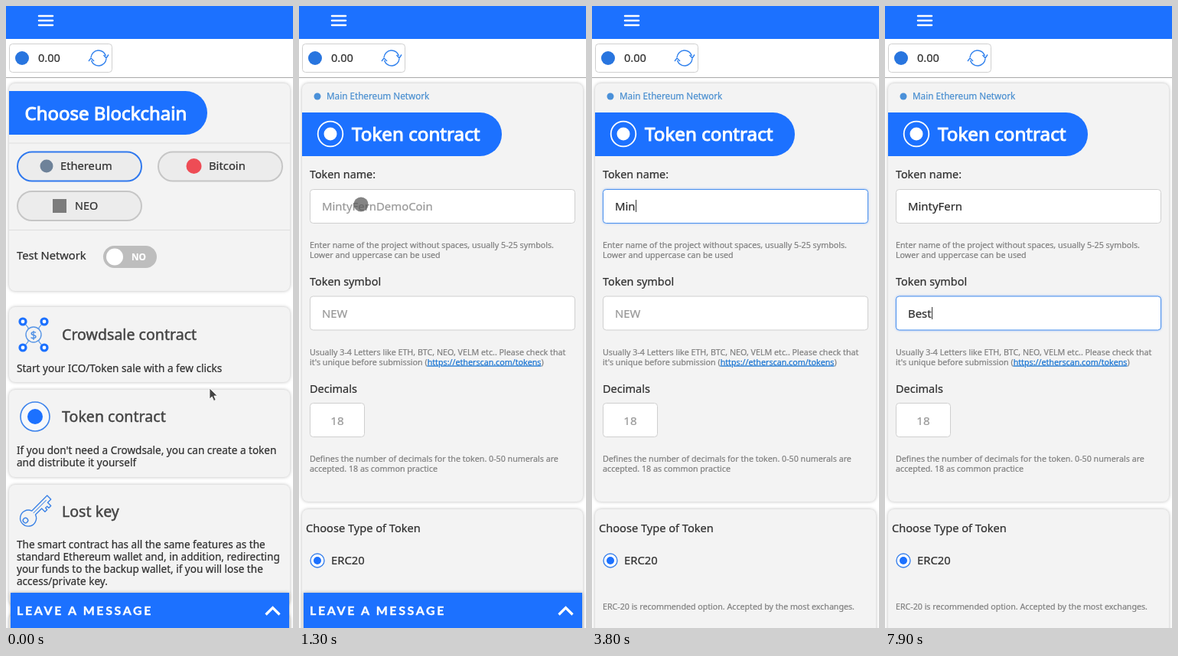
An HTML page that plays this animation: 375x812 px, repeating every 8 s.

```html
<!DOCTYPE html>
<html lang="en">
<head>
<meta charset="utf-8">
<title>Token form</title>
<style>
  html, body { margin: 0; width: 100%; height: 100%; overflow: hidden; background: #fff; }
  svg { display: block; width: 100vw; height: 100vh; }
  text { font-family: "Noto Sans", "Open Sans", sans-serif; white-space: pre; }
  .card { fill: #f3f3f3; filter: drop-shadow(0 0 2px rgba(0, 0, 0, .28)); }
  .focus { filter: drop-shadow(0 0 1.5px rgba(40, 120, 255, .45)); }
  .cta { font-family: Lato, sans-serif; font-weight: 700; letter-spacing: 2.6px; }
</style>
</head>
<body>
<svg id="stage" viewBox="0 0 375 812" xmlns="http://www.w3.org/2000/svg"></svg>
<script>
const LOOP = 8000;
const BLUE = '#1c71ff';
const INK = '#303030';
const GREY = '#808080';
const HINT = '#999';
const LINE = '#cfcfcf';
const FOCUS = '#4a90ec';
const NAME = 'MintyFern';
const SYMBOL = 'Best';

const text = (x, y, size, str, fill = INK, extra = '', weight = .22) =>
  `<text x="${x}" y="${y}" font-size="${size}" fill="${fill}" stroke="${fill}" stroke-width="${weight}" ${extra}>${str}</text>`;
const lines = (x, y, step, size, rows, fill) =>
  rows.map((row, i) => text(x, y + i * step, size, row, fill)).join('');
const heading = (x, y, str) => text(x, y, 19.6, str, '#444', '', .45);
const title = (x, y, size, str) => text(x, y, size, str, '#fff', '', 1);
const box = (x, y, w, h, r, attrs) =>
  `<rect x="${x}" y="${y}" width="${w}" height="${h}" rx="${r}" ${attrs}/>`;
const dot = (x, y, r, attrs) => `<circle cx="${x}" cy="${y}" r="${r}" ${attrs}/>`;
const path = (d, stroke, width, extra = '') =>
  `<path d="${d}" fill="none" stroke="${stroke}" stroke-width="${width}" ${extra}/>`;
const card = (y, h) => box(4, y, 367, h, 8, 'class="card"');
const ribbon = (y, right) =>
  `<path d="M4 ${y}H${right - 28.5}a28.5 28.5 0 0 1 0 57H4z" fill="${BLUE}"/>`;
const option = (x, y, color) =>
  box(x, y, 162, 38, 19, `fill="#ececec" stroke="${color}" stroke-width="2"`);
const field = (id, y, w = 346) =>
  box(14.5, y, w, 44, 4, `id="${id}" fill="#fff" stroke="${LINE}"`);

const header =
  box(0, 0, 375, 43, 0, `fill="${BLUE}"`) +
  path('M43 13H61M43 19H61M43 25H61', '#fff', 2.5, 'stroke-linecap="round"') +
  path('M0 93.5H375', '#a9a9a9', 1.2) +
  box(4.5, 49.5, 134, 37, 4, `fill="#fff" stroke="${LINE}"`) +
  dot(21, 68, 9, 'fill="#2875df"') +
  text(42, 73, 14.6, '0.00') +
  path('M111 67A10 10 0 0 1 130.5 65M131 69A10 10 0 0 1 111.5 71M127.5 64l3.5 4 3-4.5M108 72l3-4 4 4', '#2f80ed', 1.4);

const saleIcon =
  path('M25 415l4 5V424M47 415l-4 5V424M25 443l4-5V435M47 443l-4-5V435', '#5795e6', 1.2) +
  dot(36, 429, 10, 'fill="#f3f3f3" stroke="#5795e6" stroke-width="1.4"') +
  text(36, 434.5, 15, '$', '#4289e4', 'text-anchor="middle"') +
  [[22, 412], [50, 412], [22, 446], [50, 446]].map(([x, y]) =>
    dot(x, y, 4, `fill="#fff" stroke="${BLUE}" stroke-width="3.2"`)).join('');

const keyIcon = `<g transform="translate(29 668) rotate(-45)">` +
  path('M9.5 -3A10.5 10.5 0 1 0 9.5 4H21V10H25V7H28V10H32V4H38V-3Z', '#3c83e6', 1.4, 'stroke-linejoin="round"') +
  dot(-5, 0, 3.2, 'fill="none" stroke="#3c83e6" stroke-width="1.4"') +
  path('M9 .5H33', '#3c83e6', 1) + '</g>';

const menuPage =
  card(101, 271) + ribbon(111, 263) +
  title(24.5, 149, 24, 'Choose Blockchain') +
  path('M4 179H371M4 292.5H371', '#dedede', 1) +
  option(15, 190.5, '#3079ee') + option(199, 190.5, '#c6c6c6') + option(15, 242, '#c6c6c6') +
  dot(53, 209, 8.5, 'fill="#6e8299"') + text(71, 214, 14.7, 'Ethereum') +
  dot(245.5, 209, 10, 'fill="#ee4c55"') + text(265, 214, 14.8, 'Bitcoin') +
  box(61, 252, 18, 18, 0, 'fill="#7c7c7c"') + text(90, 266, 14.4, 'NEO') +
  text(14, 331, 14.7, 'Test Network') +
  box(127, 313, 70, 29, 14.5, 'fill="#bdbdbd"') + dot(142, 327.5, 11, 'fill="#fff"') +
  text(164, 332, 11.8, 'NO', '#fff', 'font-weight="700"') +
  card(393, 98) + saleIcon +
  heading(73, 436, 'Crowdsale contract') +
  text(14, 477.5, 13.6, 'Start your ICO/Token sale with a few clicks') +
  `<g id="tokenCard">` + card(501, 114) +
  dot(38, 536, 19, `fill="#f6f8fb" stroke="#3c83ec" stroke-width="1.6"`) + dot(38, 536, 10, `fill="${BLUE}"`) +
  heading(73, 543, 'Token contract') +
  lines(14, 585, 16, 13.55, ["If you don't need a Crowdsale, you can create a token", 'and distribute it yourself']) + '</g>' +
  card(625, 158) + card(793, 60) + keyIcon +
  heading(73, 667, 'Lost key') +
  lines(14, 707.5, 16.2, 13.55, [
    'The smart contract has all the same features as the',
    'standard Ethereum wallet and, in addition, redirecting',
    'your funds to the backup wallet, if you will lose the',
    'access/private key.']);

const link = '<tspan fill="#1673d2" stroke="#1673d2" text-decoration="underline">https://etherscan.com/tokens</tspan>';

const formPage =
  card(101, 546) +
  dot(24, 118, 4.5, 'fill="#4a90d9"') + text(36, 122, 11.7, 'Main Ethereum Network', '#4a8fd0') +
  ribbon(139, 265) +
  dot(41, 167, 16.3, 'fill="none" stroke="#fff" stroke-width="1.8"') + dot(41, 167, 8.5, 'fill="#fff"') +
  title(69, 176, 24.2, 'Token contract') +
  text(14, 225, 14.3, 'Token name:') + field('nameBox', 239.5) + text(30, 267, 14.9, '', INK, 'id="nameText"') +
  lines(14, 315.5, 13, 10.7, [
    'Enter name of the project without spaces, usually 5-25 symbols.',
    'Lower and uppercase can be used'], GREY) +
  text(14, 365, 14.4, 'Token symbol') + field('symbolBox', 379) + text(30, 407, 14.9, '', INK, 'id="symbolText"') +
  lines(14, 455.5, 13, 10.7, [
    'Usually 3-4 Letters like ETH, BTC, NEO, VELM etc.. Please check that',
    `it's unique before submission (${link})`], GREY) +
  text(14, 505, 14.5, 'Decimals') + field('decimalsBox', 518.5, 71) + text(50, 547, 15.2, '18', HINT, 'text-anchor="middle"') +
  lines(14, 595, 13, 10.7, [
    'Defines the number of decimals for the token. 0-50 numerals are',
    'accepted. 18 as common practice'], GREY) +
  card(657, 200) + text(9, 687, 14.6, 'Choose Type of Token') +
  dot(24, 724, 9, 'fill="#fff" stroke="#3c83ec" stroke-width="1.4"') + dot(24, 724, 5, `fill="${BLUE}"`) +
  text(42, 729, 14.8, 'ERC20') +
  text(14, 788, 10.65, 'ERC-20 is recommended option. Accepted by the most exchanges.', GREY) +
  path('M0 0V16', '#333', 1, 'id="caret"');

const messageBar =
  box(6, 766, 364, 50, 0, `fill="${BLUE}" style="filter:drop-shadow(0 0 2px rgba(0,0,0,.3))"`) +
  text(14, 795, 16, 'LEAVE A MESSAGE', '#fff', 'class="cta"', .4) +
  path('M339.5 794.5l9-9 9 9', '#fff', 3.2);

const arrow = `<path id="arrow" d="M0 0V14l3.2-3 2.4 5.4 2.5-1.1L5.8 10h4.4z" fill="#444" stroke="#fff" stroke-width=".8"/>`;

const stage = document.getElementById('stage');
stage.innerHTML = `<g id="menu">${menuPage}</g><g id="form">${formPage}</g>${header}` +
  box(0, 93, 0, 2, 0, `id="progress" fill="#2f80ed"`) +
  `<g id="bar">${messageBar}</g>${arrow}` + dot(0, 0, 9.5, 'id="touch" fill="#555" fill-opacity=".72"');

const el = {};
stage.querySelectorAll('[id]').forEach(node => el[node.id] = node);

const show = (node, on) => node.setAttribute('display', on ? 'inline' : 'none');
const ramp = (t, from, to) => Math.min(1, Math.max(0, (t - from) / (to - from)));
const ease = k => k * k * (3 - 2 * k);
const mix = (a, b, k) => a + (b - a) * k;
const typed = (word, t, times) => word.slice(0, times.filter(at => t >= at).length);

const NAME_KEYS = [2100, 3600, 3800, 4050, 4250, 4450, 4700, 4900, 5100];
const SYMBOL_KEYS = [6700, 7000, 7300, 7600];

function pointer(t) {
  const reach = ease(ramp(t, 100, 600));
  const travel = ease(ramp(t, 800, 1200));
  return [mix(mix(266, 257, reach), 81, travel), mix(mix(499, 547, reach), 259, travel)];
}

function setField(node, label, value, hint, border) {
  const color = value ? INK : HINT;
  label.textContent = value || hint;
  label.setAttribute('fill', color);
  label.setAttribute('stroke', color);
  node.setAttribute('stroke', border);
  node.setAttribute('class', border === FOCUS ? 'focus' : '');
}

function draw(t) {
  const onForm = t >= 900;
  show(el.menu, !onForm);
  show(el.form, onForm);
  show(el.bar, t < 1500);

  const hover = ease(ramp(t, 150, 450));
  const scale = 1 + .006 * hover;
  el.tokenCard.setAttribute('transform', `translate(187.5 558) scale(${scale}) translate(-187.5 -558)`);
  el.tokenCard.firstChild.style.fill = `rgb(${Array(3).fill(Math.round(243 - 8 * hover))})`;
  show(el.progress, t >= 680 && t < 1000);
  el.progress.setAttribute('width', mix(7, 375, ease(ramp(t, 700, 1000))));

  const [x, y] = pointer(t);
  const pressed = (t >= 600 && t < 800) || (t >= 1200 && t < 1400);
  show(el.touch, pressed);
  show(el.arrow, !pressed && t < 1500);
  el.touch.setAttribute('cx', x);
  el.touch.setAttribute('cy', y);
  el.arrow.setAttribute('transform', `translate(${x} ${y})`);

  const inName = t >= 1400 && t < 5700;
  const inSymbol = t >= 5700;
  const name = typed(NAME, t, NAME_KEYS);
  const symbol = typed(SYMBOL, t, SYMBOL_KEYS);
  const invalid = t >= 5900 && t < 6700;
  setField(el.nameBox, el.nameText, name, 'MintyFernDemoCoin', inName ? FOCUS : LINE);
  setField(el.symbolBox, el.symbolText, symbol, 'NEW', invalid ? '#dc4a4a' : inSymbol ? FOCUS : LINE);

  const value = inName ? name : symbol;
  const label = inName ? el.nameText : el.symbolText;
  const lastKey = Math.max(1400, inSymbol ? 5700 : 0,
    ...[...NAME_KEYS, ...SYMBOL_KEYS].filter(at => at <= t));
  const caretOn = (inName || inSymbol) && !invalid && (t - lastKey) % 1000 < 550;
  show(el.caret, caretOn);
  if (onForm) {
    const offset = value ? label.getComputedTextLength() : 0;
    el.caret.setAttribute('transform', `translate(${31 + offset} ${inName ? 253 : 393})`);
  }
}

const start = performance.now();
function frame() {
  draw((performance.now() - start) % LOOP);
  requestAnimationFrame(frame);
}
frame();
</script>
</body>
</html>
```
